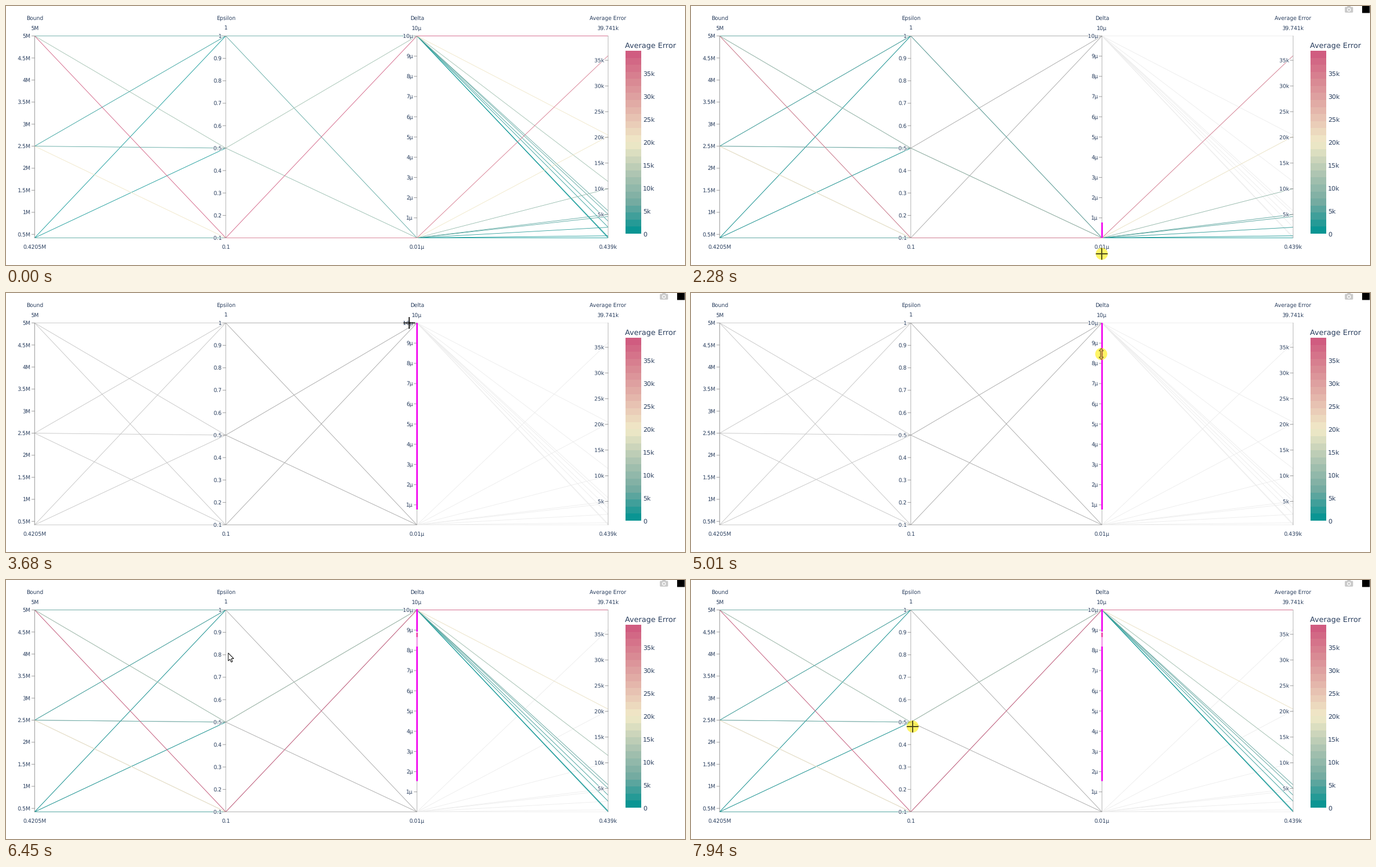
A matplotlib script for the animation above (8000 ms loop, 1210x463 px).

```python
import numpy as np
import matplotlib.pyplot as plt
from matplotlib import patheffects
from matplotlib.animation import FuncAnimation
from matplotlib.collections import LineCollection
from matplotlib.colors import LinearSegmentedColormap
from matplotlib.patches import Circle, Polygon, Rectangle, FancyBboxPatch

W, H, DPI = 1210, 463, 64
PT = 72 / DPI                      # points per pixel
LOOP, STEP = 8000, 40
INK = "#2a3f5f"
MAGENTA = "#f313f0"
TOP, BOTTOM = 53.5, 414.5
AXIS_X = np.linspace(51, 1073, 4)

plt.rcParams.update({"font.family": "DejaVu Sans", "path.snap": False,
                     "text.hinting": "none"})
fig = plt.figure(figsize=(W / DPI, H / DPI), dpi=DPI, facecolor="white")
ax = fig.add_axes([0, 0, 1, 1])
ax.set_xlim(0, W)
ax.set_ylim(H, 0)
ax.axis("off")

tealrose = LinearSegmentedColormap.from_list("tealrose", [
    "#009392", "#72aaa1", "#b1c7b3", "#f1eac8", "#e5b9ad", "#d98994", "#d0587e"])

# name, low, high, unit, tick step
AXES = [("Bound", 0.4205, 5, "M", 0.5), ("Epsilon", 0.1, 1, "", 0.1),
        ("Delta", 0.01, 10, "µ", 1), ("Average Error", 0.439, 39.741, "k", 5)]
BOUNDS, EPSILONS = (0.4205, 2.5, 5), (0.1, 0.5, 1)
ERR_MIN, ERR_MAX = AXES[3][1:3]


def error(bound, eps, delta):
    """Error grows with bound / epsilon; the bound bends it slightly."""
    if eps < 0.2:
        scale, bend = (0.795, 0.04) if delta > 1 else (0.718, 0.17)
    else:
        scale, bend = (1.14, -0.18) if delta > 1 else (1, 0)
    return max(ERR_MIN, bound / eps * scale * (5 / bound) ** bend)


def to_y(i, value):
    lo, hi = AXES[i][1:3]
    return BOTTOM - (value - lo) / (hi - lo) * (BOTTOM - TOP)


def label(x, y, s, size=9.5, ha="center", halo=False):
    """Text whose capitals are centred on y."""
    t = ax.text(x, y + 0.365 * size, s, size=size * PT, color=INK,
                ha=ha, va="baseline", zorder=5)
    if halo:
        t.set_path_effects([patheffects.withStroke(
            linewidth=2 * PT, foreground="white")])


def gap_segments(row):
    pts = [(AXIS_X[i], to_y(i, v)) for i, v in enumerate(row)]
    return list(zip(pts, pts[1:]))


def line_layer(colors, zorder):
    return ax.add_collection(LineCollection(
        list(colors), colors=list(colors.values()), linewidths=0.85 * PT,
        zorder=zorder))


def focus_layer(rows):
    """Each segment once, in the colour of its largest error."""
    colors = {}
    for row in sorted(rows, key=lambda r: r[3]):
        for seg in gap_segments(row):
            colors.pop(seg, None)
            colors[seg] = tealrose(row[3] / ERR_MAX)
    return line_layer(colors, 2)


def runs(delta):
    return [(b, e, delta, error(b, e, delta)) for b in BOUNDS for e in EPSILONS]


high_runs, low_runs = runs(10), runs(0.01)
all_runs = high_runs + low_runs
context = line_layer({seg: grey for row in all_runs for seg, grey in
                      zip(gap_segments(row), ("#c2c2c2", "#a2a2a2", "#ececec"))}, 1)
all_focus, low_focus, high_focus = map(focus_layer, (all_runs, low_runs, high_runs))

for i, (name, lo, hi, unit, step) in enumerate(AXES):
    x = AXIS_X[i]
    ax.plot([x, x], [TOP, BOTTOM], color="#909090" if i == 0 else "#b4b4b4",
            lw=PT, zorder=3)
    label(x, 21.5, name)
    label(x, 39, f"{hi:g}{unit}" if i < 3 else f"{hi:.3f}{unit}")
    label(x, 430.5, f"{lo:g}{unit}")
    used = {r[i] for r in all_runs}
    for v in step * np.arange(1, int(hi / step + 1e-6) + 1):
        y = to_y(i, v)
        ax.plot([x - 5, x], [y, y], color="#9c9c9c", lw=PT, zorder=3)
        label(x - 7, y, f"{v:g}{unit}", ha="right",
              halo=i == 3 or (i > 0 and v in used))

# colour bar
BAR_TOP, BAR_BOTTOM, BANDS = 81, 407.5, 26
ax.imshow((np.arange(BANDS)[::-1, None] + 0.5) / BANDS, cmap=tealrose,
          vmin=0, vmax=1, extent=(1104, 1132, BAR_BOTTOM, BAR_TOP),
          interpolation="nearest", aspect="auto")
ax.set_xlim(0, W)
ax.set_ylim(H, 0)
for v in range(0, 36, 5):
    y = BAR_BOTTOM - v / 39.8 * (BAR_BOTTOM - BAR_TOP)
    label(1135, y, f"{v}k" if v else "0", 11.4, "left")
label(1103, 70, "Average Error", 13.3, "left")

# toolbar
CAMERA = "#c9c9c9"
toolbar = [
    FancyBboxPatch((1166, 2.5), 13, 8.5, fc=CAMERA, lw=0,
                   boxstyle="round,pad=0.8,rounding_size=1.5"),
    Rectangle((1169.5, 0), 6, 3, fc=CAMERA, lw=0),
    Circle((1172.5, 6.7), 3.4, fc="white", lw=0),
    Circle((1172.5, 6.7), 2, fc=CAMERA, lw=0),
    Rectangle((1196, -1), 13.5, 13.5, fc="black", lw=0),
]
for p in toolbar:
    ax.add_patch(p)


# brush on the Delta axis
def brush_part(y0, y1, color):
    return ax.add_patch(Rectangle((731, y0), 3, y1 - y0, fc=color, lw=0, zorder=6))


brush = brush_part(0, 0, MAGENTA)
seams = [brush_part(102, 119, "#f6a6ee"), brush_part(94, 102, "#ee4fae"),
         brush_part(92.5, 94, "white")]

# pointer shapes around their hot spot
ARROW = np.array([(0, 0), (0, 14), (3.2, 11.2), (5.4, 16.3), (7.6, 15.3),
                  (5.5, 10.2), (9.8, 10)])
half = np.array([(0, -10), (4, -5.5), (1.4, -5.5)])
RESIZE = np.vstack([half, half[::-1] * (1, -1), half[1:] * (-1, -1),
                    half[:0:-1] * (-1, 1)])
CROSS = np.array([(-10.5, 0), (10.5, 0), (np.nan, np.nan), (0, -10.5), (0, 10.5)])

glow = ax.add_patch(Circle((0, 0), 10.7, fc="#ffee00", alpha=0.6, lw=0, zorder=8))
shape = ax.add_patch(Polygon(ARROW, closed=True, fc="white", ec="black",
                             lw=PT, zorder=9))
cross, = ax.plot([], [], lw=1.9 * PT, solid_capstyle="butt", zorder=9)

# start, end, x, y of each pointer move
START = np.array([808, 418])
MOVES = [
    (230, 340, 732, 431), (620, 1000, 731, 386), (1160, 1600, 732, 443),
    (2680, 2820, 718, 266), (3150, 3480, 718.5, 53.5), (3680, 4100, 757, 98),
    (4100, 4460, 731, 109), (5160, 5400, 734.5, 81.5), (5940, 6440, 396, 130.5),
    (6440, 7000, 392, 89), (7000, 7410, 397, 196), (7560, 7920, 395, 262),
]
KINDS = [(0, "arrow"), (270, "cross"), (3780, "arrow"), (4400, "resize"),
         (6000, "arrow"), (6500, "cross")]
PRESSED = [(1040, 3500), (4840, 5670), (7250, LOOP)]
DRAG, RELEASE, PAN = 1460, 3600, 5160
PRESS_Y, LAG = 387, 80


def pointer(t):
    """Each move eases out from where the last one ended."""
    pos = START
    for t0, t1, x, y in MOVES:
        u = np.clip((t - t0) / (t1 - t0), 0, 1)
        pos = pos + (np.array([x, y]) - pos) * u * (2 - u)
    return pos


def brush_span(t):
    if t < DRAG:
        return 0, 0
    y = np.clip(pointer(min(t - LAG, RELEASE))[1], TOP, BOTTOM)
    pan = pointer(max(t, PAN))[1] if t < 5500 else pointer(5500)[1]
    shift = pointer(PAN)[1] - pan
    return max(52, min(y, PRESS_Y) - shift), max(y, PRESS_Y) - shift


def draw_pointer(t):
    pos = pointer(t)
    kind = [k for start, k in KINDS if t >= start][-1]
    shown = t >= 70
    down = any(a <= t < b for a, b in PRESSED)
    glow.set_visible(shown and down)
    glow.center = pos
    cross.set_visible(shown and kind == "cross")
    cross.set_data(*(CROSS + pos).T)
    cross.set_color("#45431a" if down else "#111111")
    shape.set_visible(shown and kind != "cross")
    shape.set_xy((RESIZE if kind == "resize" else ARROW) + pos)
    shape.set_facecolor("#e9b45f" if down else "white")
    shape.set_edgecolor("#6b6420" if down else "black")


def update(n):
    t = n * STEP
    context.set_visible(t >= DRAG)
    all_focus.set_visible(t < DRAG)
    low_focus.set_visible(DRAG <= t < 2700)
    high_focus.set_visible(t >= 5280)
    for p in toolbar:
        p.set_alpha(np.interp(t, [40, 80, 320], [0, 0.4, 1]))
    top, bottom = brush_span(t)
    brush.set_y(top)
    brush.set_height(bottom - top)
    for s in seams:
        s.set_visible(t >= 5400)
    draw_pointer(t)
    return [context, all_focus, low_focus, high_focus, *toolbar, brush, *seams,
            glow, shape, cross]


anim = FuncAnimation(fig, update, frames=LOOP // STEP, interval=STEP,
                     repeat=True, repeat_delay=0, blit=False)
plt.show()
```
